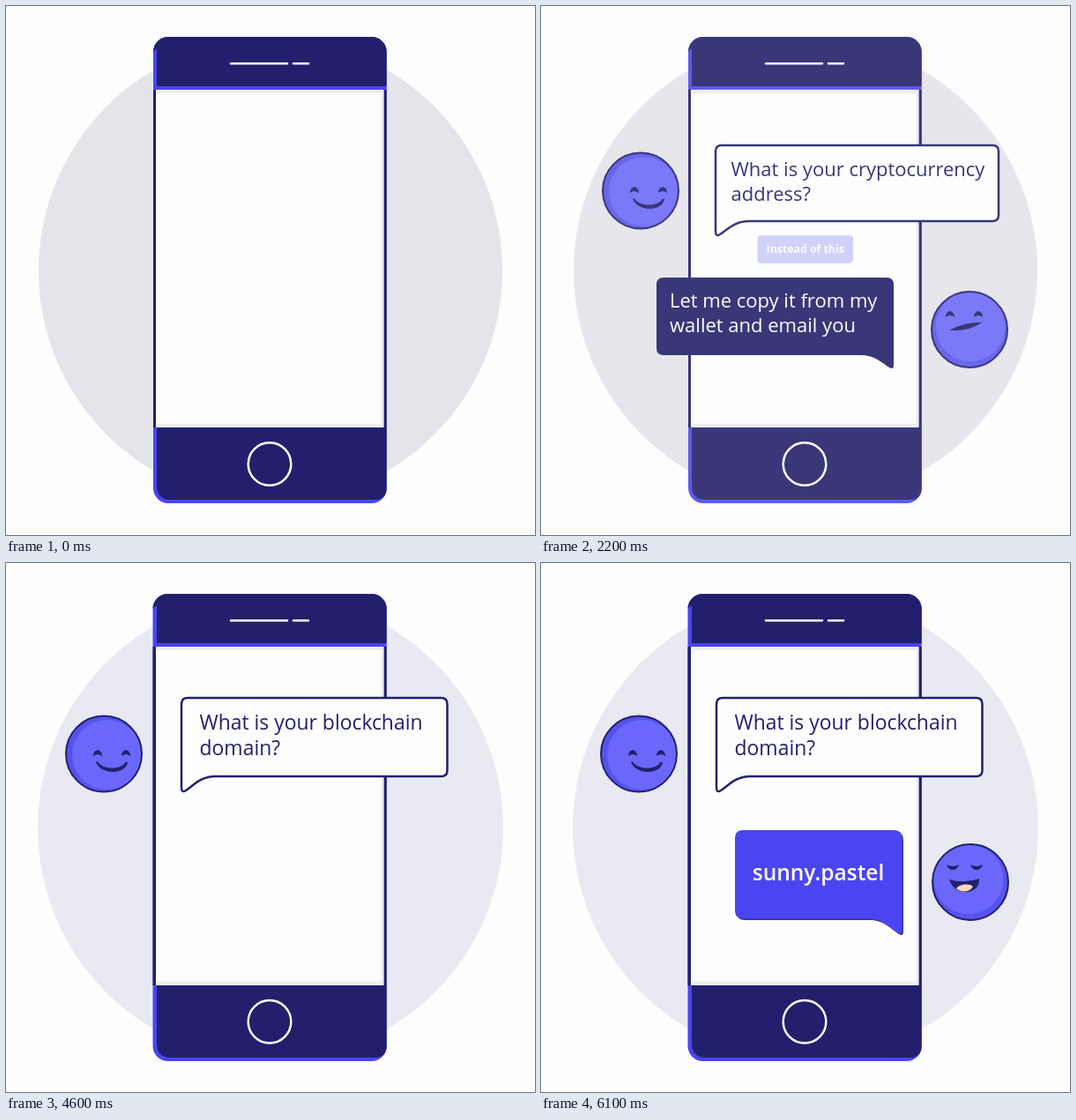
An HTML page that plays this animation: 600 by 600 pixels, repeating every 6200 ms.

```html
<!DOCTYPE html>
<html lang="en">
<head>
<meta charset="utf-8">
<title>Chat on a phone</title>
<style>
  html, body { margin: 0; width: 100%; height: 100%; overflow: hidden; background: #fdfdfd; }
  svg { display: block; width: 100vw; height: 100vh; }
  text { font-family: "Open Sans", "Noto Sans", sans-serif; white-space: pre; }
  .disc { fill: var(--disc); }
  .navy { fill: var(--navy); }
  .blue { fill: var(--blue); }
  .paper { fill: #fdfdfd; }
  .pale { fill: #fff; }
  .line { fill: none; stroke: #fff; stroke-width: 2.5; stroke-linecap: round; }
  .inset { fill: none; stroke: #ececf2; stroke-width: 2.5; }
  .edge { stroke: var(--navy); stroke-width: 2.5; stroke-linejoin: round; }
  .rim { fill: none; stroke: var(--navy); stroke-width: 2; }
  .skin { fill: var(--skin); }
  .shade { fill: var(--shade); }
  .tag { fill: #4a45f0; }
  .tagText { fill: #fff; font-weight: 700; font-size: 17.2px; text-anchor: middle; }
  .name { fill: #fff; font-weight: 600; font-size: 24.5px; text-anchor: middle; }
</style>
</head>
<body>
<svg id="stage" viewBox="0 0 600 600"></svg>
<script>
const LOOP = 6200, SWITCH = 3195;
const stage = document.getElementById('stage');

// Colours: first scene, first scene faded, second scene
const COLORS = {
  disc:  ['#e4e4ea', '#f3f3f5', '#e9e9f2'],
  navy:  ['#22206c', '#c4c4c4', '#22206c'],
  blue:  ['#4a45f0', '#dcdce2', '#4a45f0'],
  skin:  ['#6a67fa', '#e6e6e8', '#6a67fa'],
  shade: ['#5652ee', '#dedee1', '#5652ee']
};

const group = (id, body) => `<g id="${id}">${body}</g>`;

const lines = (x, y, gap, size, cls, rows) => rows.map((row, i) =>
  `<text class="${cls}" x="${x}" y="${y + i * gap}" font-size="${size}">${row}</text>`).join('');

// Speech bubble whose tail hangs from the side at x
function bubble(x, far, top, bottom, drop, r, cls) {
  const d = Math.sign(far - x), px = n => x + d * n, tip = bottom + drop;
  return `<path class="${cls}" d="M${px(r)} ${top}H${far - d * r}Q${far} ${top} ${far} ${top + r}
    V${bottom - r}Q${far} ${bottom} ${far - d * r} ${bottom}H${px(38)}
    C${px(22)} ${bottom} ${px(14)} ${tip - 7} ${px(5)} ${tip - 1}
    Q${x} ${tip + 2} ${x} ${tip - 4}V${top + r}Q${x} ${top} ${px(r)} ${top}Z"/>`;
}

function phone(x, h, cy) {
  const end = 35 + h, low = end - 86;
  return `<rect class="blue" x="${x}" y="35" width="${431.7 - x}" height="${h}" rx="17"/>
    <path class="navy" d="M${x} 52A17 17 0 0 1 ${x + 17} 35H414.7A17 17 0 0 1 431.7 52V91H171V50Q171 46 ${x} 52Z"/>
    <path class="navy" d="M171 ${low}H431.7V${end - 17}Q431.7 ${end - 5} 420 ${end - 4}H187Q171 ${end - 4} 171 ${end - 20}Z"/>
    <rect class="navy" x="${x}" y="95" width="${431.7 - x}" height="${low - 95}"/>
    <rect class="paper" x="170" y="95" width="258.5" height="${low - 95}"/>
    <path class="inset" d="M171 97.5H427V${low - 3}H171"/>
    <path class="line" d="M255 65.2H319M326 65.2H343"/>
    <circle class="line" cx="299" cy="${cy}" r="24.3"/>`;
}

// Face parts are drawn around the centre of the head
const head = (dx, dy) => `<circle class="shade" r="43"/>
  <circle class="skin" cx="${dx}" cy="${dy}" r="39.5"/><circle class="rim" r="43"/>`;
const archEye = (x, y) =>
  `<path class="navy" d="M${x - 5} ${y + 3}C${x - 5} ${y - 6} ${x + 5} ${y - 6} ${x + 5} ${y + 3}Q${x} ${y - 1} ${x - 5} ${y + 3}Z"/>`;
const shutEye = (x, y) =>
  `<path class="navy" d="M${x - 7} ${y - 3}Q${x} ${y + 1} ${x + 7} ${y - 3}Q${x + 5} ${y + 3} ${x} ${y + 3}Q${x - 5} ${y + 3} ${x - 7} ${y - 3}Z"/>`;
const smile =
  '<path class="navy" d="M-9 9Q-7 8 -6 10C0 18 19 18 24 10Q26 8 27 10C24 24 -4 24 -9 9Z"/>';

const happy = head(3.5, 1) + archEye(-7, -.5) + archEye(25, -.5) + smile;
const unsure = head(1, -3.3) + archEye(-22, -17) + archEye(10, -17) +
  group('slant', '<path class="navy" d="M-19 0Q-9 -2.8 0 -2.8T19 -.6Q10 3 0 3T-19 0Z"/>');
const laugh = head(-2, -3.3) + shutEye(-20, -17) + shutEye(7, -17) +
  group('grin', `<path class="navy" d="M-24 -3Q-7 2 10 -4C11 15 -18 17 -24 -3Z"/>
    <path d="M-16 7C-12 2 -1 1 3 5C-1 12 -11 12 -16 7Z" fill="#ffd9b8"/>`);

const tag = (x, y, w, label) => `<rect class="tag" x="${x}" y="${y}" width="${w}" height="44" rx="5.5"/>
  <text class="tagText" x="${x + w / 2}" y="${y + 27}">${label}</text>`;

stage.innerHTML =
  group('before',
    '<circle class="disc" cx="300" cy="300" r="263"/>' + phone(167, 529, 519.5) +
    group('face1', happy) +
    group('ask1', bubble(198, 519, 158, 244, 16, 7, 'paper edge') +
      lines(215.5, 193, 28, 22, 'navy', ['What is your cryptocurrency', 'address?'])) +
    group('face2', unsure) +
    group('reply1', bubble(400, 131, 308, 396, 15, 8, 'navy') +
      lines(146, 342, 28, 22, 'pale', ['Let me copy it from my', 'wallet and email you'])) +
    group('tag1', tag(224, 254, 151.5, 'Instead of this'))) +
  group('after',
    '<circle class="disc" cx="300" cy="300" r="264"/>' + phone(166.5, 530, 520.3) +
    group('tag2', tag(235, 256, 130, 'You get this')) +
    group('face3', happy) +
    group('ask2', bubble(199, 500.5, 153, 242, 17, 7, 'paper edge') +
      lines(219.5, 188.5, 29.5, 22.9, 'navy', ['What is your blockchain', 'domain?'])) +
    group('face4', laugh) +
    group('reply2', `<g transform="translate(1 1)" style="--blue:#34328f">${bubble(410, 221, 304, 404, 17, 9, 'blue')}</g>` +
      bubble(409.5, 220, 303, 403.5, 17, 9, 'blue') +
      '<text class="name" x="314.5" y="360">sunny.pastel</text>'));

const $ = id => document.getElementById(id);
const span = (t, a, b) => Math.min(1, Math.max(0, (t - a) / (b - a)));
const smooth = p => p * p * (3 - 2 * p);
const backOut = (p, c) => 1 + (c + 1) * (p - 1) ** 3 + c * (p - 1) ** 2;

function mix(a, b, p) {
  const part = (c, i) => parseInt(c.slice(i, i + 2), 16);
  return `rgb(${[1, 3, 5].map(i => Math.round(part(a, i) + (part(b, i) - part(a, i)) * p))})`;
}

// id, start, length, overshoot, pivot, and whether the part is drawn around its pivot
const POPS = [
  ['face1', 80, 620, 2.2, 113, 209.5, true],
  ['ask1', 180, 520, .8, 198, 260],
  ['face2', 1080, 620, 2.2, 486, 367, true],
  ['reply1', 1080, 560, .8, 400, 411],
  ['face3', 3280, 600, 2, 111, 216.5, true],
  ['ask2', 3330, 570, .9, 199, 259],
  ['face4', 4610, 610, 2.2, 487, 362, true],
  ['reply2', 4610, 590, .9, 410, 421]
];

function scaleAt(el, x, y, s, local) {
  el.setAttribute('transform', `translate(${x} ${y}) scale(${s})` + (local ? '' : ` translate(${-x} ${-y})`));
  el.style.display = s > .02 ? '' : 'none';
}

function draw(t) {
  const second = t >= SWITCH;
  $('before').style.display = second ? 'none' : '';
  $('after').style.display = second ? '' : 'none';

  const fade = smooth(span(t, 2140, 2400));
  for (const [key, [normal, faded, later]] of Object.entries(COLORS))
    stage.style.setProperty('--' + key, second ? later : mix(normal, faded, fade));

  for (const [id, start, length, c, x, y, local] of POPS)
    scaleAt($(id), x, y, backOut(span(t, start, start + length), c), local);

  const shown = span(t, 2140, 2400);
  scaleAt($('tag1'), 299.7, 276, backOut(shown, 1.2));
  $('tag1').style.opacity = shown;
  const left = 1 - span(t, 4140, 4400);
  scaleAt($('tag2'), 300, 278, backOut(left, 1.2));
  $('tag2').style.opacity = left;

  const tilt = -13 * smooth(span(t, 1640, 1990));
  $('slant').setAttribute('transform', `translate(-4 -3.5) rotate(${tilt})`);
  const open = .4 + .6 * smooth(span(t, 4800, 5300)) - .15 * Math.sin(Math.PI * span(t, 5500, 6000));
  $('grin').setAttribute('transform', `translate(0 -2) scale(1 ${open}) translate(0 2)`);
}

const begin = performance.now();
function tick() {
  draw((performance.now() - begin) % LOOP);
  requestAnimationFrame(tick);
}
draw(0);
requestAnimationFrame(tick);
</script>
</body>
</html>
```
